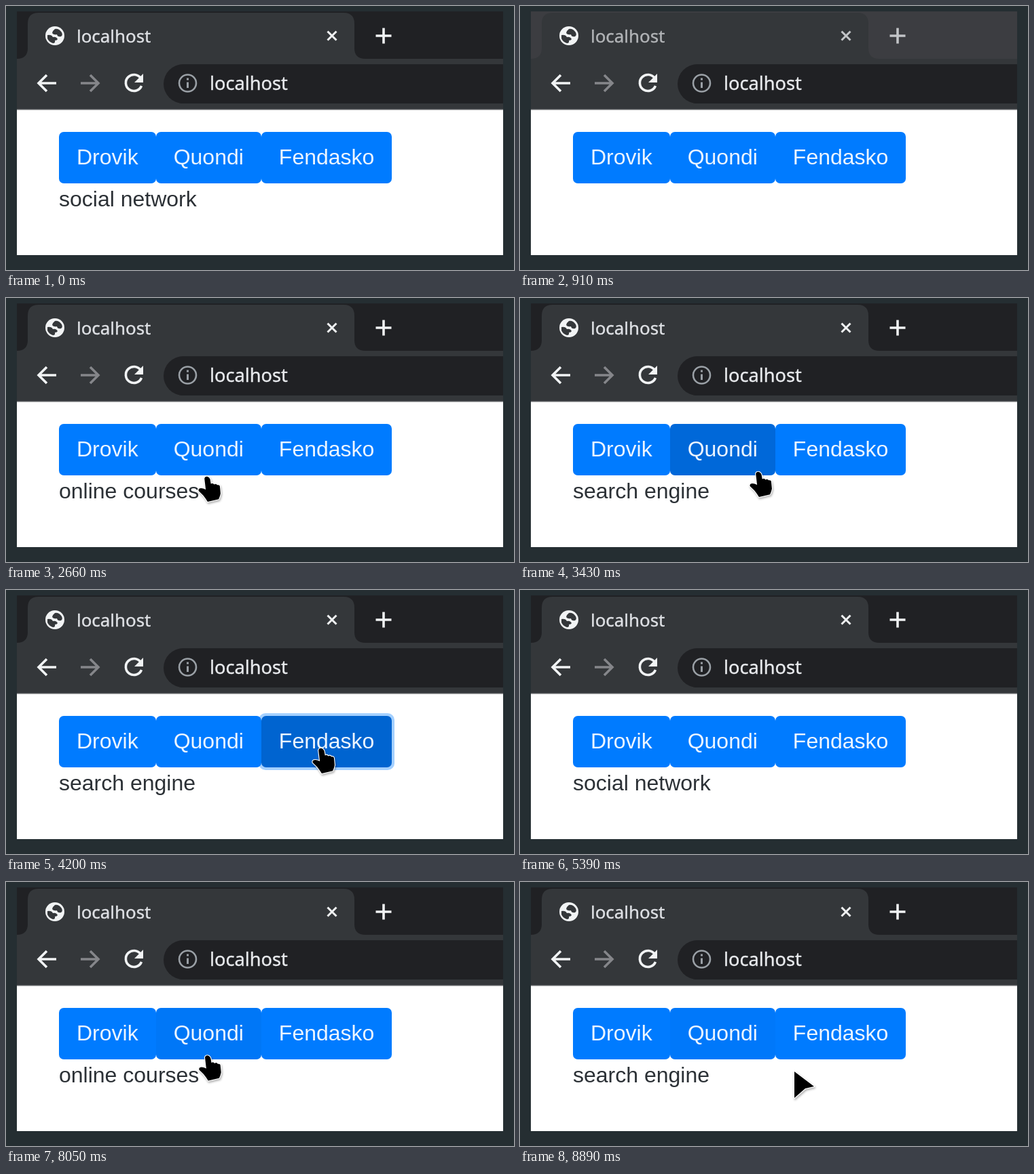
These frames come from a looping animation (748x390 px, 8960 ms). An HTML page:

```html
<!DOCTYPE html>
<html lang="en">
<head>
<meta charset="utf-8">
<title>Button group demo</title>
<style>
  html, body { margin: 0; width: 100%; height: 100%; overflow: hidden; background: #252e32; }
  svg { display: block; width: 748px; height: 390px; }
  .ui { font-family: "Noto Sans", "Open Sans", sans-serif; stroke-width: .4; }
  .page { font: 32px "Liberation Sans", Arial, sans-serif; }
  .line { fill: none; stroke-width: 3.6; }
  .cursor { fill: #000; stroke: #fff; stroke-width: 2.4; stroke-linejoin: round; paint-order: stroke;
    filter: drop-shadow(1px 2px 1.5px rgba(0, 0, 0, .3)); }
</style>
</head>
<body>
<svg viewBox="0 0 748 390">
  <defs><clipPath id="frame"><rect x="16" y="8" width="716" height="360"/></clipPath></defs>
  <rect width="748" height="390" fill="#252e32"/>
  <g clip-path="url(#frame)">
    <rect x="16" y="8" width="716" height="360" fill="#fff"/>
    <rect id="strip" x="16" y="8" width="716" height="71"/>
    <path fill="#34373a" d="M16 78Q32 78 32 62V26Q32 10 48 10H497Q513 10 513 26V62Q513 78 529 78H732V153H16Z"/>
    <rect x="16" y="152" width="716" height="1.5" fill="#5f6164"/>

    <circle cx="72" cy="44" r="14" fill="#f1f3f4"/>
    <path fill="#34373a" d="M72 34Q78 33 82 39Q84 43 81 45Q76 46 75 42Q70 43 68 40Q69 36 72 34ZM61 43Q67 42 69 46Q74 45 76 49Q75 51 72 51Q73 55 69 55Q63 53 61 48Z"/>
    <text id="tab" class="ui" x="104" y="53.5" font-size="25.9">localhost</text>
    <g id="tabIcons" class="line">
      <path d="M473.500 37.500L486.500 50.500M486.500 37.500L473.500 50.500" stroke-width="3"/>
      <path d="M544.500 44H567.500M556 32.500V55.500"/>
    </g>

    <path class="line" stroke="#f1f3f4" d="M74 114H49M60 102L48 114L60 126"/>
    <path class="line" stroke="#85868a" d="M110 114H135M124 102L136 114L124 126"/>
    <path class="line" stroke="#f1f3f4" d="M198.500 107A12 12 0 1 0 199.500 118"/>
    <path fill="#f1f3f4" d="M202 100V113H189Z"/>

    <path fill="#202124" d="M732 86H261A29 29 0 0 0 261 144H732Z"/>
    <circle class="line" cx="267.500" cy="114" r="12.500" stroke="#9aa0a6" style="stroke-width:2.600"/>
    <path fill="#9aa0a6" d="M266 106.500h3v3h-3ZM266 112.500h3v8.500h-3Z"/>
    <text class="ui" x="300" y="123.500" font-size="27.200" fill="#e8eaed" stroke="#e8eaed">localhost</text>

    <g id="halos" fill="#80bdff"></g>
    <g id="faces" class="page"></g>
    <text id="note" class="page" x="78" y="295.500" fill="#2c3136"></text>

    <g id="cursor" class="cursor">
      <path id="hand" transform="translate(-1 -1) scale(.95)" d="M-4 3Q-3 -1 1 0Q4 1 5 5L6 11Q9 9 11 12Q14 10 16 13Q20 12 20 16L21 26Q20 31 18 35L1 39Q-2 34 -6 29L-13 22Q-14 18 -9 18Q-6 18 -2 20Z"/>
      <path id="arrow" d="M0 0L29 22L16 25L0 39Z"/>
    </g>
  </g>
</svg>
<script>
const LOOP = 8960, CYCLE = 5320, STEP = 70;
const CLEAR = 560, PRESS = 170, FADE = 140;
const TOP = 186, HEIGHT = 76, PAD = 26;

const buttons = [
  { label: 'Drovik', note: 'online courses', press: 1960 },
  { label: 'Quondi', note: 'search engine', press: 3010 },
  { label: 'Fendasko', note: 'social network', press: 4100 }
];

// Pointer stops: enter, button, dip, button, dip, button, leave
const stops = [
  { t: 1680, x: 250, y: 372 }, { t: 1820, x: 159, y: 215 },
  { t: 2200, x: 159, y: 215 }, { t: 2520, x: 262, y: 276 },
  { t: 2660, x: 297, y: 265 }, { t: 2870, x: 300, y: 236 },
  { t: 3290, x: 300, y: 236 }, { t: 3570, x: 404, y: 280 },
  { t: 3850, x: 465, y: 235 }, { t: 4550, x: 465, y: 235 },
  { t: 5110, x: 746, y: 273 }
];

const $ = id => document.getElementById(id);
const set = (el, attrs) => { for (const k in attrs) el.setAttribute(k, attrs[k]); };
const within = (v, a, b) => v >= a && v < b;
const mix = (a, b, k) => a + (b - a) * k;
const smooth = k => k * k * (3 - 2 * k);

function add(parent, tag, attrs, text = '') {
  const el = document.createElementNS('http://www.w3.org/2000/svg', tag);
  set(el, attrs);
  el.textContent = text;
  return $(parent).appendChild(el);
}

let left = 78;
for (const b of buttons) {
  b.face = add('faces', 'rect', { y: TOP, height: HEIGHT, rx: 7 });
  const label = add('faces', 'text', { x: left + PAD, y: 234, fill: '#edf5ff' }, b.label);
  b.x = Math.round(left);
  left += label.getComputedTextLength() + 2 * PAD;
  b.w = Math.round(left) - b.x;
  set(b.face, { x: b.x, width: b.w });
  b.halo = add('halos', 'rect', { x: b.x - 4, y: TOP - 4, width: b.w + 8, height: HEIGHT + 8, rx: 10 });
}

function pointer(t) {
  const i = stops.findIndex(s => s.t > t);
  if (i < 1) return stops[0];
  const a = stops[i - 1], b = stops[i], k = smooth((t - a.t) / (b.t - a.t));
  return { x: mix(a.x, b.x, k), y: mix(a.y, b.y, k) };
}

const over = (b, p, slack = 0) =>
  within(p.x, b.x, b.x + b.w) && within(p.y, TOP, TOP + HEIGHT + slack);
const pressed = (b, t) => within(t, b.press, b.press + PRESS);
const tone = (b, t) => pressed(b, t) ? 1 : over(b, pointer(t)) ? .75 : 0;

// Averaging the recent states gives a linear fade between them.
function faded(state, b, t) {
  const n = 14;
  let sum = 0;
  for (let i = 0; i < n; i++) sum += Number(state(b, t - (i + .5) * FADE / n));
  return sum / n;
}

function noteAt(t) {
  const clicked = buttons.filter(b => b.press + PRESS <= t).pop();
  return clicked ? clicked.note : t < CLEAR ? buttons[2].note : '';
}

function draw(time) {
  const t = Math.floor(time % LOOP / STEP) * STEP % CYCLE;
  const active = !within(t, CLEAR, buttons[0].press);
  const tabText = active ? '#dfe1e5' : '#b2b4b7';
  set($('strip'), { fill: active ? '#202124' : '#3c3d41' });
  set($('tab'), { fill: tabText, stroke: tabText });
  set($('tabIcons'), { stroke: active ? '#f1f3f4' : '#c2c4c7' });
  $('note').textContent = noteAt(t);

  for (const b of buttons) {
    const s = faded(tone, b, t);
    set(b.face, { fill: `rgb(0,${Math.round(mix(123, 98, s))},${Math.round(mix(255, 204, s))})` });
    set(b.halo, { opacity: faded(pressed, b, t) });
  }

  const p = pointer(t);
  const shown = within(t, stops[0].t, stops[stops.length - 1].t);
  const hand = buttons.some(b => over(b, p, 4));
  set($('cursor'), { visibility: shown ? 'visible' : 'hidden', transform: `translate(${p.x} ${p.y})` });
  set($('hand'), { display: hand ? 'inline' : 'none' });
  set($('arrow'), { display: hand ? 'none' : 'inline' });
}

const start = performance.now();
function tick() {
  draw(performance.now() - start);
  requestAnimationFrame(tick);
}
tick();
</script>
</body>
</html>
```
